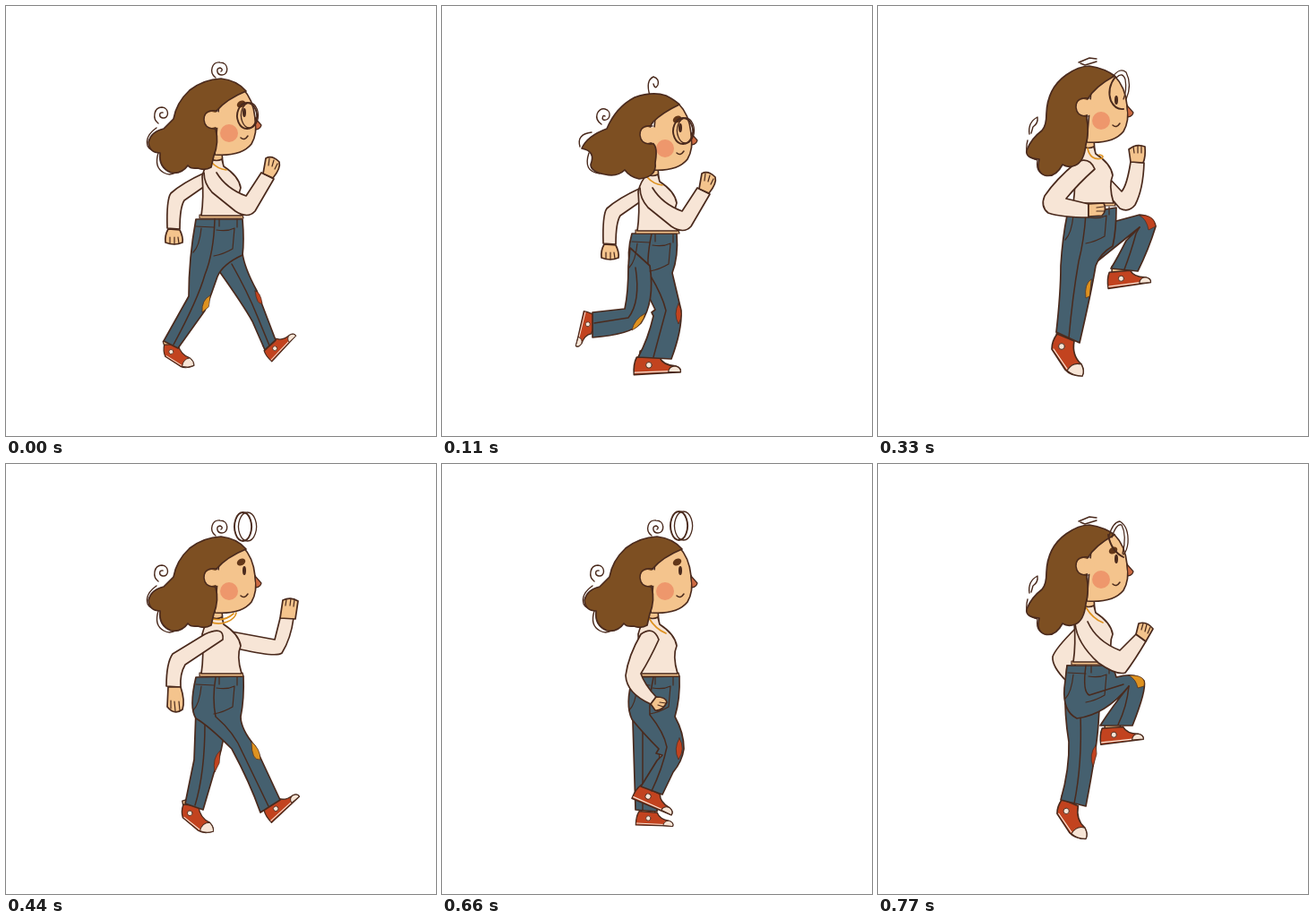
Recreate the animation shown at these times as an HTML page with a canvas. Size 480 by 480 pixels, loop 0.88 s.

```html
<!DOCTYPE html>
<html lang="en">
<head>
<meta charset="utf-8">
<title>Walk cycle</title>
<style>
html, body { margin: 0; height: 100%; overflow: hidden; background: #fff; }
canvas { display: block; width: 480px; height: 480px; }
</style>
</head>
<body>
<canvas id="stage" width="480" height="480"></canvas>
<script>
const ctx = document.getElementById('stage').getContext('2d');
const INK = '#4a2a1d';
const COLORS = {
  hair: '#7d4f22', skin: '#f4c48d', shirt: '#f7e5d6', jeans: '#45606f',
  red: '#c2431f', orange: '#de9220', blush: '#ee976c', nose: '#cd6a42'
};
const FRAME_MS = 110;

function shape(color, d, width = 1.7) {
  const path = new Path2D(d);
  ctx.fillStyle = COLORS[color];
  ctx.fill(path);
  ctx.strokeStyle = INK;
  ctx.lineWidth = width;
  if (width) ctx.stroke(path);
}

function line(d, color = INK, width = 1.5) {
  ctx.strokeStyle = color;
  ctx.lineWidth = width;
  ctx.stroke(new Path2D(d));
}

function oval(x, y, rx, ry, color, rotation = 0) {
  ctx.beginPath();
  ctx.ellipse(x, y, rx, ry, rotation, 0, Math.PI * 2);
  ctx.fillStyle = color;
  ctx.fill();
}

function ring(x, y, rx, ry, tilt, width) {
  ctx.beginPath();
  ctx.ellipse(x, y, rx, ry, tilt, 0, Math.PI * 2);
  ctx.strokeStyle = INK;
  ctx.lineWidth = width;
  ctx.stroke();
}

// Parts are drawn back to front.
const jeans = (d, seam = '') => () => { shape('jeans', d); line(seam); };
const sleeve = d => () => shape('shirt', d);
const hand = (d, fingers) => () => { shape('skin', d); line(fingers, INK, 1.2); };
const patch = (color, d) => () => shape(color, d, 0.7);

const FLAT_SHOE = {
  body: 'M-13 -2L13 -2Q17 7 31 8Q38 10 37 15L-16 18Q-17 6 -13 -2Z',
  toe: 'M23 15Q24 8 31 8Q38 10 37 15Z',
  sole: 'M-15 15.5L24 14', badge: [1, 7]
};
const TIPTOE_SHOE = {
  body: 'M-9 -4L10 4Q7 20 18 30Q22 38 19 43Q6 43 0 36L-15 13Q-15 4 -9 -4Z',
  toe: 'M2 37Q8 27 18 30Q22 38 19 43Q9 43 2 37Z',
  sole: 'M-13 13L2 35', badge: [-4, 10]
};
const shoeOf = model => (x, y, degrees, size) => () => {
  ctx.save();
  ctx.translate(x, y);
  ctx.rotate(degrees * Math.PI / 180);
  ctx.scale(size, size);
  shape('skin', 'M-9 -9L9 -9L10 0L-10 0Z');
  shape('red', model.body);
  line(model.sole, COLORS.shirt, 1.3);
  shape('shirt', model.toe, 1.2);
  oval(...model.badge, 3.4, 3.4, COLORS.shirt);
  ring(...model.badge, 3.4, 3.4, 0, 1);
  ctx.restore();
};
const shoe = shoeOf(FLAT_SHOE);
const tiptoe = shoeOf(TIPTOE_SHOE);

// Limbs shared by opposite steps.
const armBack = [
  sleeve('M222 186Q196 198 184 209Q179 216 180 248L194 249Q194 225 199 217L222 201Z'),
  hand('M181 249L194 250Q198 258 197 264Q188 268 178 264Q177 256 181 249Z', 'M183 265L183 258M188 266L188 258M193 265L192 258')
];
const armFront = [
  sleeve('M235 186Q246 204 268 212L285 186L299 193L278 229Q270 238 256 229L230 208Q221 198 221 186'),
  hand('M287 187L290 170Q297 166 305 174Q307 181 298 192Z', 'M294 170L293 178M299 172L297 179M303 176L300 182')
];
const armPassing = [
  sleeve('M222 190Q236 180 242 196Q232 218 222 234Q226 246 239 260L233 268Q206 256 205 236Q208 214 222 190Z'),
  hand('M239 260Q250 260 251 266Q246 276 238 275L233 268Z', 'M241 269L247 271M243 266L250 267')
];
const legPlanted = color => [
  shoe(230, 394, 0, 0.98),
  jeans('M212 254L262 254Q264 280 257 298L267 340Q268 362 256 394L219 392Q230 372 236 346L234 342L238 339Q226 312 210 296Q206 275 212 254Z',
    'M234 254Q227 288 232 300Q246 323 250 340L236 392'),
  patch(color, 'M264 332Q270 344 264 355Q258 344 264 332Z')
];
const legTrailing = color => [
  shoe(168, 356, 106, 0.75),
  jeans('M210 270L232 290Q238 330 222 354Q210 367 168 370L168 342L204 338Q208 320 208 290Z', 'M216 292Q222 330 208 348L170 354'),
  patch(color, 'M227 343Q224 356 212 362Q214 350 227 343Z')
];
const legStraight = [
  shoe(230, 390, 5, 0.78),
  jeans('M212 255L216 386L240 388L244 300Z', 'M224 290L224 386')
];
const legPassing = color => [
  shoe(232, 365, 26, 0.9),
  jeans('M213 238L265 237Q266 262 260 282Q270 300 270 318Q268 332 258 344L246 369L222 360L240 331L246 325L239 323L242 318Q224 300 212 285Q204 268 213 238Z',
    'M236 238Q231 262 232 280Q248 300 251 316Q246 340 234 365'),
  patch(color, 'M265 306Q272 318 264 330Q258 318 265 306Z')
];

const NECKLACE = 'M229 174Q236 182 246 183';

const HAIR = {
  level: {
    mass: 'M268 95Q246 104 235 117L234 138Q238 152 232 167L229 180Q222 184 214 181Q206 182 203 178Q196 188 184 186Q170 180 172 164Q160 164 159 152Q162 140 176 137L187 126Q190 108 205 94Q220 82 240 81Q258 83 268 95Z',
    curls: 'M234 80C226 74 230 62 239 63C249 63 249 77 241 77C235 77 234 69 239 69Q243 71 240 73M170 131C163 126 165 113 174 113C183 114 182 126 175 125C170 124 171 118 175 119M168 136Q155 145 158 156Q160 161 168 162M170 164Q165 180 176 186Q183 190 189 186'
  },
  low: {
    mass: 'M265 93Q246 102 236 112Q230 118 231 136Q242 134 238 158Q240 174 220 176Q210 174 204 166Q196 174 182 171Q166 168 166 160Q172 145 156 142Q162 128 184 120Q194 96 215 85Q235 78 250 83Q260 88 265 93Z',
    curls: 'M232 83Q227 66 236 62Q243 64 241 71Q238 77 236 70M178 115C168 108 174 96 182 98C190 100 188 112 180 110C178 108 180 104 182 106M167 124Q150 126 154 140M164 147Q157 168 176 170'
  },
  high: {
    mass: 'M264 92Q242 104 234 118L233 140Q236 154 232 169Q230 188 220 192Q212 195 206 191Q198 206 186 203Q176 199 180 185Q164 184 166 175Q171 162 183 153Q188 148 188 134Q189 106 210 91Q224 81 236 81Q254 84 264 92Z',
    curls: 'M224 77L236 72L244 73M226 78L231 80L244 76M169 157Q167 144 178 138Q179 145 173 149L171 156M167 164Q162 183 178 186M178 186Q175 204 194 203'
  }
};

// Glasses: a heavy near rim and lighter far rims.
const wornGlasses = dy => ({
  near: `M269 ${108 + dy}a11 14.5 0 1 0 .1 0Z`,
  far: `M272 ${108 + dy}a9.5 14 0 1 1 -.1 0Z`
});
const flyingGlasses = y => ({
  near: `M264.5 ${y - 16}a9.5 16 0 1 0 .1 0Z`,
  far: `M269.5 ${y - 16}a10 16 0 1 0 .1 0Z`
});

// Each pose: vertical shift, hair, glasses, necklace, parts behind and in front of the torso.
const poses = [
  {
    dy: 0, hair: 'level', glasses: wornGlasses(0), necklace: NECKLACE,
    behind: [
      ...armBack,
      shoe(296, 379, -44, 0.74),
      jeans('M236 260L264 276Q266 292 280 318L301 373L289 384L275 352Q265 334 238 296Z', 'M252 288Q270 320 280 345L294 379'),
      patch('red', 'M278 318Q284 319 286 332Q280 334 278 318Z'),
      tiptoe(184, 378, -24, 0.74),
      jeans('M212 238L264 238Q266 262 264 278Q242 288 236 302Q230 320 222 340L192 382L176 374L204 324Q204 282 212 238Z', 'M233 238Q232 275 222 300Q214 328 187 378'),
      patch('orange', 'M228 323Q218 328 219 342L226 336Z')
    ],
    front: armFront
  },
  {
    dy: 17, hair: 'low', glasses: wornGlasses(17), necklace: NECKLACE,
    behind: [...legPlanted('red'), ...legTrailing('orange')],
    behindShifted: armBack, frontShifted: armFront
  },
  {
    dy: 0, hair: 'level', glasses: wornGlasses(0), necklace: 'M231 172Q238 184 250 189',
    behind: [...legStraight, ...legPassing('orange')],
    front: armPassing
  },
  {
    dy: -14, hair: 'high', browHidden: true, necklace: 'M234 173Q237 187 250 184Q253 181 247 180',
    glasses: {
      near: 'M265 79Q255 92 260 106Q265 116 274 115',
      far: 'M262 79Q270 68 277 74Q284 88 277 104M266 80Q273 73 276 82Q278 94 274 104'
    },
    behind: [
      sleeve('M256 190L272 207Q278 200 282 174L297 175Q296 205 287 222Q280 231 270 226L258 212Z'),
      hand('M282 174L280 160Q288 153 298 157Q299 168 296 175Z', 'M285 157L286 164M290 156L290 164M294 156L294 164'),
      shoe(270, 298, -5, 0.9),
      jeans('M246 236L266 240L292 233Q308 234 310 246Q302 272 290 296L260 293Q268 280 277 262L292 247L246 284Z', 'M292 247L288 254Q282 276 275 294'),
      patch('red', 'M292 234Q308 232 310 246L302 250Q300 238 292 234Z'),
      tiptoe(209, 370, 0, 1),
      jeans('M211 234L266 225Q266 250 262 268Q248 276 243 290Q238 320 225 376L199 364Q204 320 204 290Q206 258 211 234Z', 'M232 232Q230 262 224 285Q217 325 213 371'),
      patch('orange', 'M238 305Q230 310 232 326L236 324Z')
    ],
    front: [
      sleeve('M222 174Q236 168 242 182Q224 198 210 215L235 221L235 236Q205 236 190 231Q181 224 186 212Q198 194 222 174Z'),
      hand('M235 221L252 220Q256 228 250 234L235 235Z', 'M244 225L252 224M244 229L252 229')
    ]
  },
  {
    dy: 0, hair: 'level', glasses: flyingGlasses(70), necklace: 'M228 176C240 182 256 174 257 166M231 173Q244 176 254 167',
    behind: [
      sleeve('M246 186L300 196L306 172L321 172Q318 195 308 211Q302 216 262 207Z'),
      hand('M306 172L309 152Q318 148 326 153L323 173Z', 'M313 151L312 158M318 150L317 158M322 151L321 159'),
      tiptoe(206, 381, -17, 0.82),
      jeans('M212 275L245 290Q242 320 232 345L220 386L200 379L210 330Z', 'M222 290Q222 345 211 381'),
      patch('red', 'M239 320Q230 328 233 344L238 334Z'),
      shoe(297, 381, -40, 0.8),
      jeans('M212 238L265 237Q266 262 262 282Q262 296 278 315L306 375L284 389Q272 355 252 318Q226 292 212 284Q204 272 212 238Z', 'M234 238Q230 262 234 282Q255 300 264 322L293 382'),
      patch('orange', 'M274 310Q284 318 284 330Q274 332 274 310Z')
    ],
    front: [
      sleeve('M222 190Q244 180 242 196Q218 212 200 224Q194 234 195 249L179 248Q179 222 186 212Z'),
      hand('M181 249L195 249Q200 264 197 274Q188 281 180 271Z', 'M184 273L184 264M189 276L188 265M194 275L193 265')
    ]
  },
  {
    dy: 16.5, hair: 'low', glasses: flyingGlasses(66), necklace: 'M232 170C244 174 254 164 254 157C250 153 244 161 240 170',
    behind: [
      sleeve('M246 204L288 216L297 186L312 187Q310 212 299 234Q292 238 258 232Z'),
      hand('M297 186L296 170Q306 166 315 172L313 187Z', 'M301 170L301 177M306 169L306 178M311 170L310 178'),
      ...legTrailing('red'), ...legPlanted('orange')
    ],
    front: [
      sleeve('M222 205Q240 200 240 214Q212 230 196 240Q188 256 188 278L172 276Q173 246 180 234Q190 222 222 205Z'),
      hand('M173 277L188 278Q192 288 188 292Q178 294 171 288Z', 'M176 291L176 284M181 292L181 284M185 292L185 285')
    ]
  },
  {
    dy: 0, hair: 'level', glasses: flyingGlasses(69), necklace: 'M231 172Q238 184 250 189',
    behind: [...legStraight, ...legPassing('red')],
    front: armPassing
  },
  {
    dy: -13, hair: 'high', necklace: 'M232 173Q240 186 251 190',
    glasses: {
      near: 'M257 79Q260 97 274 104',
      far: 'M258 80Q262 65 270 64Q280 70 279 88Q278 97 274 101M261 82Q266 66 272 68Q278 80 273 100'
    },
    behind: [
      sleeve('M220 184Q198 206 195 215Q194 226 210 242L220 226Z'),
      tiptoe(214, 378, 0, 0.94),
      jeans('M211 225L250 228L246 290Q244 320 232 382L204 375Q214 340 213 310Q208 280 209 250Z', 'M226 280Q228 335 219 379'),
      patch('red', 'M243 314Q235 324 240 338L244 324Z'),
      shoe(262, 296, -4, 0.9),
      jeans('M211 225L262 225L266 238Q288 232 297 242Q300 252 284 292L248 292Q262 270 280 248Q254 280 222 284Q206 276 208 250Z', 'M232 225Q228 255 236 258L274 246M280 248Q278 270 268 291'),
      patch('orange', 'M280 236Q300 235 297 248L290 250Q288 240 280 236Z')
    ],
    front: [
      sleeve('M234 176Q244 198 270 208L288 190L299 198Q286 220 276 233Q266 236 246 222Q222 200 220 178'),
      hand('M288 190L291 178Q300 175 307 184L299 198Z', 'M296 178L294 185M300 179L298 187M304 182L301 189')
    ]
  }
];

function drawTorso(necklace) {
  line('M235 250Q247 252 255 248L253 271Q243 277 232 279M218 248Q216 268 209 275M212 246L232 247M258 238L258 247M238 238L238 246', INK, 1.2);
  shape('skin', 'M216 233L264 233L265 237L216 237Z', 1.2);
  shape('skin', 'M230 160L241 160L242 180L229 180Z');
  shape('shirt', 'M229 171Q235 174 241 171L243 179Q260 190 262 203Q257 214 263 234L218 234Q221 214 219 190Q222 178 229 171Z');
  line(necklace, COLORS.orange, 1.7);
}

function drawHead(hair, browHidden) {
  line(hair.curls, INK, 1.4);
  shape('skin', 'M240 84L264 92Q276 104 278 125Q281 142 274 154Q263 168 233 166Z');
  shape('nose', 'M278 125L285 133Q284 137 279 138Z', 1.2);
  oval(249, 142, 10, 10, COLORS.blush);
  if (!browHidden) oval(262.5, 109.5, 5, 3.7, '#633719', -0.5);
  oval(266, 119, 2, 5, INK);
  line('M262 147Q266 151 270 145');
  shape('hair', hair.mass);
  oval(229.5, 127, 8.5, 9, COLORS.skin);
  oval(236, 127, 6, 9, COLORS.skin);
  line('M235 117Q221 115 221 127Q222 138 234 137');
}

function drawGlasses({ near, far }) {
  line(far, INK, 1.3);
  line(near, INK, 1.9);
}

const drawAll = (parts = []) => parts.forEach(part => part());

function shifted(dy, draw) {
  ctx.save();
  ctx.translate(0, dy);
  draw();
  ctx.restore();
}

function drawPose(pose) {
  ctx.clearRect(0, 0, 480, 480);
  shifted(pose.dy, () => drawAll(pose.behindShifted));
  drawAll(pose.behind);
  shifted(pose.dy, () => drawTorso(pose.necklace));
  drawAll(pose.front);
  shifted(pose.dy, () => {
    drawAll(pose.frontShifted);
    drawHead(HAIR[pose.hair], pose.browHidden);
  });
  drawGlasses(pose.glasses);
}

ctx.lineJoin = ctx.lineCap = 'round';
const start = performance.now();

function tick() {
  const elapsed = performance.now() - start;
  drawPose(poses[Math.floor(elapsed / FRAME_MS) % poses.length]);
  requestAnimationFrame(tick);
}
tick();
</script>
</body>
</html>
```
